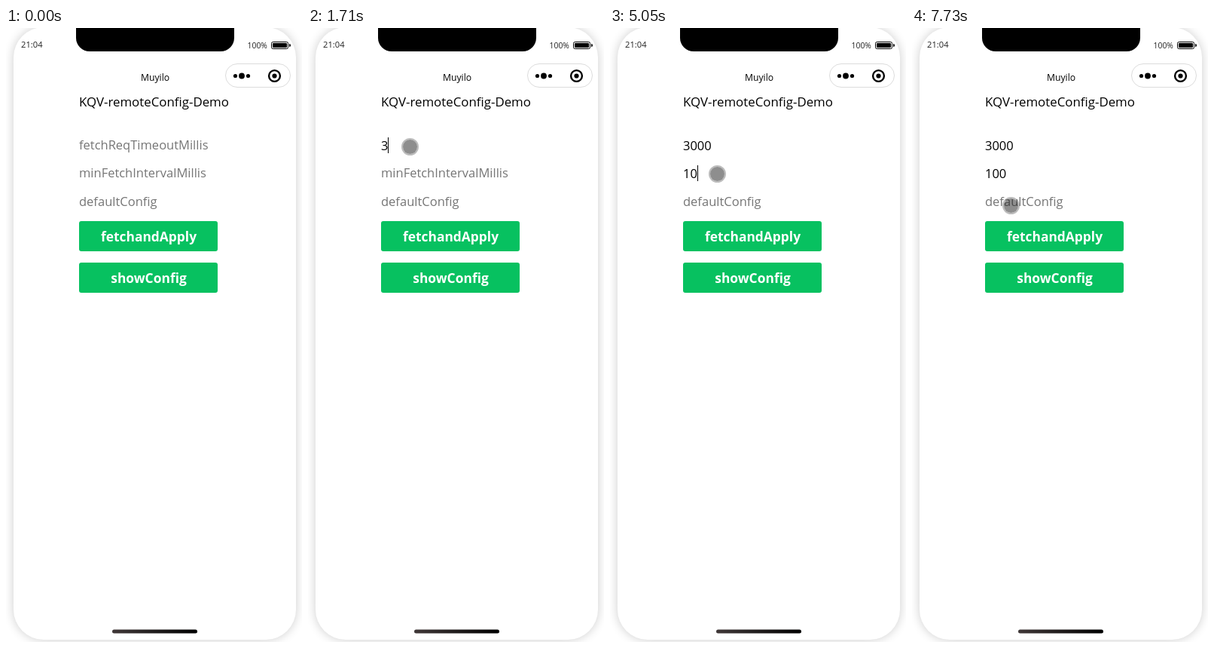
Animation of 393 by 814 pixels, one loop 8000 ms. Source, as an HTML page:

```html
<!DOCTYPE html>
<html lang="en">
<head>
<meta charset="utf-8">
<title>Remote config demo</title>
<style>
  html, body { margin: 0; width: 100%; height: 100%; overflow: hidden; background: #fff; }
  #phone {
    position: absolute; left: 10px; top: -1px; width: 375px; height: 812px;
    border-radius: 40px; box-shadow: 0 0 14px rgba(0, 0, 0, .2);
  }
  svg { position: absolute; left: 0; top: 0; font: 16.5px "Open Sans", "Noto Sans", sans-serif; }
  .status { fill: #222; }
  .button rect { fill: #07c160; }
  .button text { fill: #fff; font-size: 17.4px; font-weight: 700; text-anchor: middle; }
</style>
</head>
<body>
<div id="phone"></div>
<svg width="393" height="814" viewBox="0 0 393 814">
  <defs>
    <linearGradient id="barShade">
      <stop stop-color="#403838"/>
      <stop offset="1" stop-color="#000"/>
    </linearGradient>
  </defs>

  <!-- status bar -->
  <rect x="93" y="-30" width="210" height="61" rx="18"/>
  <text class="status" x="20" y="26" font-size="11.2">21:04</text>
  <text class="status" x="320.5" y="27" font-size="10.4">100%</text>
  <rect x="352.5" y="18.5" width="22" height="9" rx="2" fill="none" stroke="#000"/>
  <rect x="354" y="20" width="19" height="6" rx="1"/>
  <path d="M376 21q2 0 2 2t-2 2Z"/>

  <!-- navigation bar -->
  <text x="198" y="70" font-size="12.2" text-anchor="middle">Muyilo</text>
  <rect x="291.5" y="47.5" width="86" height="31" rx="15.5" fill="#fff" stroke="#dcdcdc"/>
  <circle cx="304.5" cy="63.5" r="2.6"/>
  <circle cx="313" cy="63.5" r="3.9"/>
  <circle cx="321.5" cy="63.5" r="2.6"/>
  <circle cx="356.5" cy="63.5" r="7.4" fill="none" stroke="#000" stroke-width="2.4"/>
  <circle cx="356.5" cy="63.5" r="3.1"/>

  <!-- page -->
  <text x="97" y="104" font-size="16.85">KQV-remoteConfig-Demo</text>
  <g id="fields"></g>
  <g class="button">
    <rect x="97" y="256" width="184" height="40" rx="3"/>
    <text x="189.5" y="283">fetchandApply</text>
  </g>
  <g class="button">
    <rect x="97" y="311" width="184" height="40" rx="3"/>
    <text x="189.5" y="338">showConfig</text>
  </g>
  <rect x="141" y="797.5" width="113" height="5" rx="2.5" fill="url(#barShade)"/>

  <rect id="caret" width="1" height="21"/>
  <g id="touch">
    <circle r="10.5" fill="none" stroke="#505050" stroke-opacity=".38" stroke-width="2"/>
    <circle id="touchFill" r="9.5" fill="#1e1e1e"/>
  </g>
</svg>
<script>
const LOOP = 8000, BLINK = 530, PRESS = 100;
const FIELD_X = 97, FIELD_Y = 145, DIGIT_WIDTH = 9.4;

const fields = [
  { hint: 'fetchReqTimeoutMillis', value: '3000', focusAt: 790, keys: [1710, 1990, 2140, 2450] },
  { hint: 'minFetchIntervalMillis', value: '100', focusAt: 3850, keys: [4770, 5050, 5820] },
  { hint: 'defaultConfig', value: '', focusAt: 7170, keys: [] }
];

const touchStart = { x: 311.5, y: 772.5 };
const moves = [
  { from: 30, to: 720, x: 135.5, y: 157.5 },
  { from: 3280, to: 3850, x: 142.5, y: 193.5 },
  { from: 6260, to: 6640, x: 55.5, y: 273.5 },
  { from: 6640, to: 6900, x: 167.5, y: 241 },
  { from: 6900, to: 7070, x: 131.5, y: 235.5 }
];

const $ = id => document.getElementById(id);
const setAttributes = (node, values) => {
  for (const name in values) node.setAttribute(name, values[name]);
};
const easeOut = (p, power) => 1 - (1 - p) ** power;
const isPressed = time => fields.some(({ focusAt }) => time >= focusAt - PRESS && time < focusAt);

for (const field of fields) {
  field.node = document.createElementNS('http://www.w3.org/2000/svg', 'text');
  field.node.setAttribute('x', FIELD_X);
  $('fields').append(field.node);
}

function drawFields(time) {
  fields.forEach(({ node, hint, value, keys }, i) => {
    const text = value.slice(0, keys.filter(key => key <= time).length);
    const baseline = Math.round(FIELD_Y + 15.6 + i * 37.5);
    node.textContent = text || hint;
    setAttributes(node, { y: text ? baseline + 1 : baseline, fill: text ? '#000' : '#757575' });
  });
}

// The blink restarts on focus and on every key; a new press takes the focus away.
function drawCaret(time) {
  const focus = fields.findLastIndex(field => field.focusAt <= time);
  if (focus < 0 || isPressed(time)) return $('caret').setAttribute('opacity', 0);
  const { focusAt, keys } = fields[focus];
  const typed = keys.filter(key => key <= time);
  const idle = time - (typed.at(-1) ?? focusAt);
  setAttributes($('caret'), {
    x: Math.round(FIELD_X + typed.length * DIGIT_WIDTH),
    y: FIELD_Y + focus * 37,
    opacity: Math.floor(idle / BLINK) % 2 ? 0 : 1
  });
}

function drawTouch(time) {
  let { x, y } = touchStart;
  for (const move of moves) {
    const p = Math.min(1, Math.max(0, (time - move.from) / (move.to - move.from)));
    x += (move.x - x) * easeOut(p, 1.8);
    y += (move.y - y) * easeOut(p, 4.2);
  }
  setAttributes($('touch'), {
    transform: `translate(${x} ${y})`,
    opacity: time < moves[0].from ? 0 : 1
  });
  $('touchFill').setAttribute('fill-opacity', isPressed(time) ? .65 : .5);
}

const start = performance.now();
function frame() {
  const time = (performance.now() - start) % LOOP;
  drawFields(time);
  drawCaret(time);
  drawTouch(time);
  requestAnimationFrame(frame);
}
frame();
</script>
</body>
</html>
```
